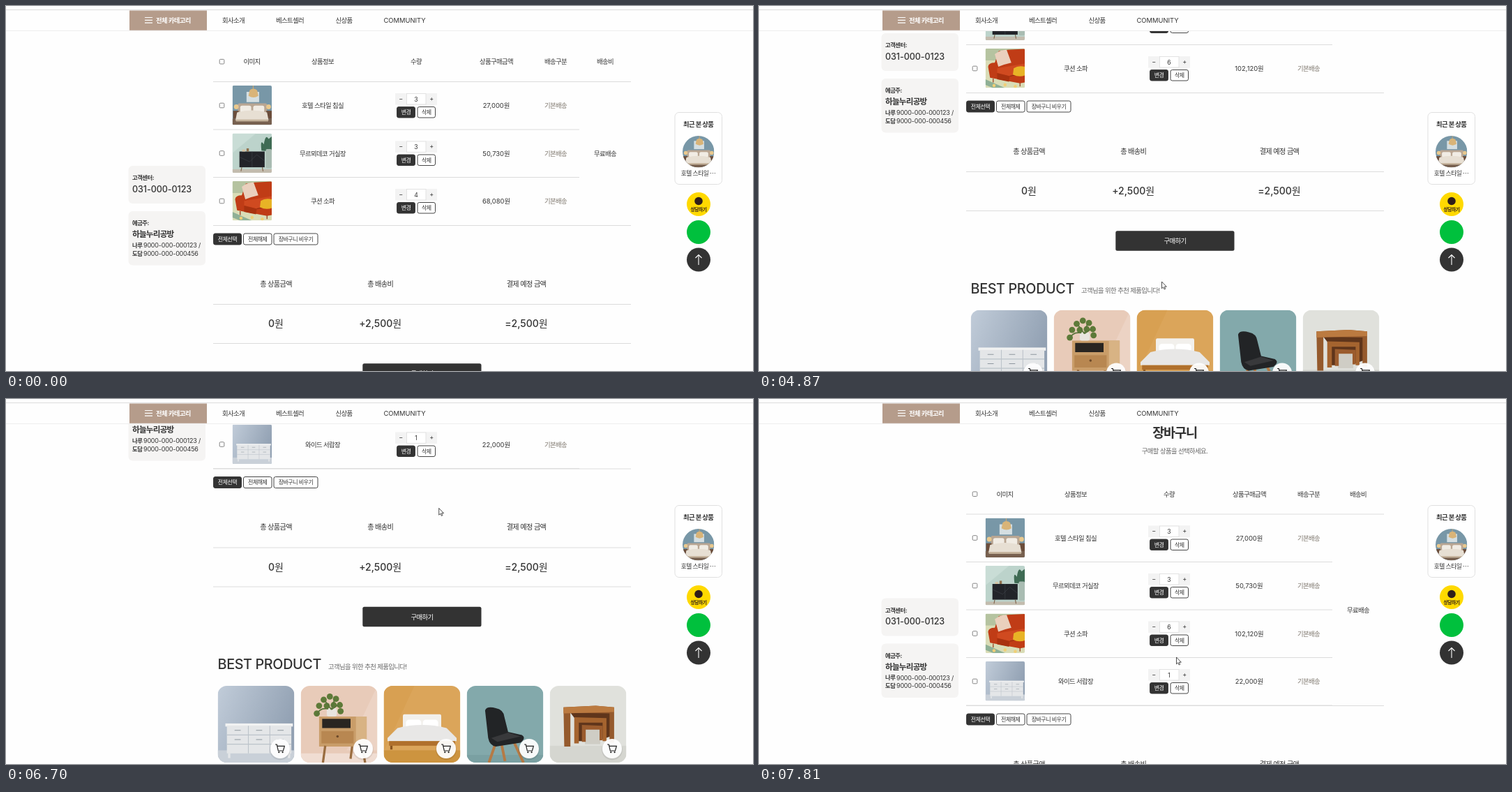
Recreate the animation shown at these times as an HTML page. Size 1071x523 px, loop 8 s.

```html
<!DOCTYPE html>
<html lang="ko">
<head>
<meta charset="utf-8">
<title>장바구니</title>
<style>
  html, body { margin: 0; width: 100%; height: 100%; overflow: hidden; background: #fefefe; }
  svg { display: block; width: 1071px; height: 523px; }
  text { font-family: Inter, "Noto Sans CJK KR", "Noto Sans CJK", sans-serif; white-space: pre; }
  .ui text { font-family: "Noto Sans", "Noto Sans CJK KR", "Noto Sans CJK", sans-serif; }
</style>
</head>
<body>
<svg id="stage" viewBox="0 0 1071 523"></svg>
<script>
const LOOP = 8000, ROW = 68.5, TABLE_TOP = 108.5, TABLE_END = TABLE_TOP + 3 * ROW;
const DARK = '#333', BROWN = '#b59c8b';

// y is the vertical centre of the text
function text(str, x, y, { size = 9.4, anchor = 'middle', weight = 400, fill = DARK, ls, extra = '' } = {}) {
  const spacing = ls ?? (/[\dA-Z]/.test(str) ? 0 : -0.065 * size);
  return `<text x="${x}" y="${y + 0.37 * size}" font-size="${size}" text-anchor="${anchor}" font-weight="${weight}" fill="${fill}" letter-spacing="${spacing}" ${extra}>${str}</text>`;
}
const left = (str, x, y, opts) => text(str, x, y, { anchor: 'start', ...opts });
const rect = (x, y, w, h, fill, r = 0, extra = '') =>
  `<rect x="${x}" y="${y}" width="${w}" height="${h}" rx="${r}" fill="${fill}" ${extra}/>`;
const circle = (x, y, r, fill, extra = '') => `<circle cx="${x}" cy="${y}" r="${r}" fill="${fill}" ${extra}/>`;
const path = (d, fill, extra = '') => `<path d="${d}" fill="${fill}" ${extra}/>`;
const stroke = (d, color, width = 1) => path(d, 'none', `stroke="${color}" stroke-width="${width}"`);
const rule = (y, x2 = 896, x1 = 297) => stroke(`M${x1} ${y}H${x2}`, '#dcdcdc');
const group = (id, body, extra = '') => `<g id="${id}" ${extra}>${body}</g>`;
const photo = (name, x, y, size, extra = '') => `<use href="#${name}" x="${x}" y="${y}" width="${size}" height="${size}" ${extra}/>`;
const checkbox = y => rect(306.2, y - 3.3, 6.6, 6.6, '#fff', 1.2, 'stroke="#767676" stroke-width=".9"');

function button(label, x, y, w, h, dark, size = 8, id = '') {
  return rect(x + .5, y + .5, w - 1, h - 1, dark ? DARK : '#fff', 2.5, `stroke="${DARK}" stroke-width=".9" ${id && `id="${id}"`}`)
    + text(label, x + w / 2, y + h / 2, { size, fill: dark ? '#fff' : DARK, weight: dark ? 500 : 400 });
}

const photos = {
  bedroom: rect(0, 0, 100, 100, '#7897a7') + rect(0, 84, 100, 16, '#77604f') + rect(36, 16, 32, 26, '#d5dfe2')
    + stroke('M53 0V10', '#c9a873', 2) + path('M44 12Q53 4 63 12L66 26Q54 34 41 26Z', '#d9b478')
    + rect(14, 45, 74, 32, '#b9a693', 4) + circle(10, 54, 6, '#e9c88d') + circle(92, 54, 6, '#e9c88d')
    + rect(2, 64, 14, 20, '#6b4d3b') + rect(86, 64, 14, 20, '#6b4d3b')
    + rect(20, 51, 28, 18, '#f1ece4', 5) + rect(53, 51, 28, 18, '#f1ece4', 5)
    + path('M12 68Q50 58 88 68L92 88H8Z', '#e7dfd3') + rect(9, 86, 82, 5, '#c4b29b'),
  lounge: rect(0, 0, 100, 100, '#bcd3cb') + path('M0 0H60L0 50Z', '#c9ddd6') + rect(0, 91, 100, 9, '#c3bcae')
    + path('M74 44Q70 12 80 28Q84 0 92 14L100 8V46Z', '#3f6b54') + rect(85, 40, 15, 48, '#a9bcb2', 3)
    + rect(18, 46, 64, 40, '#222429') + stroke('M50 46V86M18 60L44 72L62 54L82 70', '#4b4e55', .8)
    + stroke('M24 86L22 96M76 86L78 96', '#7d6249', 2) + rect(36, 38, 6, 8, '#91724f') + rect(25, 41, 8, 5, '#d6c3a3'),
  sofa: rect(0, 0, 100, 100, '#d9dcb6') + path('M0 0H100V30H0Z', '#b5c3a0') + path('M0 78L50 100H20L0 92Z', '#8fb096')
    + path('M7 46Q8 36 24 36L34 6L58 3L100 1V86L88 88L12 74Z', '#c03c16') + path('M30 50L100 38V62L62 70L30 62Z', '#d04a20')
    + path('M30 62L62 70L60 84L30 78Z', '#a8320f') + stroke('M62 70L100 62M20 76V86M88 87V96', '#8f2a0d', 2)
    + path('M24 14Q40 2 54 3L66 36Q48 40 33 46Z', '#ead0bd') + path('M72 50Q84 42 100 46V68Q86 74 70 66Z', '#e8b326')
    + circle(22, 94, 4, '#f0cf76') + circle(50, 92, 4, '#f0cf76') + circle(76, 96, 4, '#f0cf76'),
  dresser: rect(0, 0, 100, 100, 'url(#wall)') + rect(0, 84, 100, 16, '#c9d0d8') + rect(10, 49, 88, 4, '#f1f2f2')
    + rect(12, 52, 84, 36, '#e4e6e8') + stroke('M12 64H96M12 76H96M40 52V88M68 52V88', '#bcc3ca', 1)
    + stroke('M22 58H30M50 58H58M78 58H86M22 70H30M50 70H58M78 70H86', '#8e979f', 1) + stroke('M15 88V94M93 88V94', '#e4e6e8', 3),
  nightstand: rect(0, 0, 100, 100, '#e8cbb9') + path('M100 0V84H60Z', '#ecd3c4') + rect(0, 88, 100, 12, '#f0ddd2')
    + path('M24 40H86V77L80 79H24Z', '#c99d69') + path('M72 40H86V77L80 79H72Z', '#d8b384') + rect(28, 43, 37, 12, '#292521') + rect(27, 59, 42, 16, '#b88751')
    + circle(48, 66, 1.6, '#6e4a2a') + stroke('M32 78L29 100M80 78L84 100M67 79L65 95', '#9a6d40', 3) + rect(34, 29, 13, 11, '#e9e5df', 3)
    + [[30, 18], [38, 14], [46, 17], [51, 25], [43, 25], [34, 26], [24, 26], [21, 36], [52, 33]].map(([x, y]) => circle(x, y, 4, '#5d7a38')).join('')
    + stroke('M40 31L32 20M40 31L44 18M40 31L50 24M36 30Q24 28 21 38', '#58733a', 1.5),
  bed: rect(0, 0, 100, 100, '#dba55a') + path('M0 0H40L0 86Z', '#d8a052') + rect(0, 84, 100, 16, '#cd943f')
    + rect(25, 37, 50, 22, '#f2f0ec', 2) + rect(29, 44, 20, 11, '#fff', 4) + rect(51, 44, 20, 11, '#fff', 4)
    + path('M18 55Q50 47 82 55L95 68V72H5V68Z', '#e8e7e6') + rect(7, 72, 86, 6, '#b0702c') + stroke('M10 78V83M90 78V83', '#8b551f', 3),
  chair: rect(0, 0, 100, 100, '#83a9ab') + rect(0, 90, 100, 10, '#7aa0a2')
    + stroke('M38 74L29 100M62 74L74 100M45 74L50 98', '#b57a45', 3.5)
    + path('M24 32Q26 26 38 29Q48 31 49 40L54 60L72 64Q78 68 70 74L38 79Q30 78 28 68Z', '#222426') + path('M32 68L54 61L70 66L40 73Z', '#38393b'),
  tables: rect(0, 0, 100, 100, '#e0e1dc') + rect(0, 78, 100, 22, '#d5d6d0')
    + path('M27 35H79V66L62 72H34V44Z', '#5f351b') + rect(46, 56, 20, 20, '#cfcdc5')
    + path('M18 28L60 26L84 28V74H78V36L27 35V79H19Z', '#955a2d') + path('M18 28L60 26L84 28V34L18 36Z', '#bb7a40')
    + path('M32 41L74 42V72H69V48H38V75H32Z', '#a5642f') + path('M42 51L69 52V71H65V57H47V73H42Z', '#9b5c2e'),
};

function itemRow({ name, art, qty, price }, i) {
  const y = TABLE_TOP + i * ROW;
  return group('row' + i, checkbox(y + 34) + photo(art, 324.5, y + 5.5, 56.5, 'clip-path="inset(0 round 2px)"')
    + text(name, 454, y + 34.3, { weight: 500 })
    + rect(558, y + 16.5, 60, 16.5, '#f3f3f3') + rect(602, y + 16.5, 16, 16.5, '#f3f3f3', 0, `id="plus${i}"`)
    + rect(574.5, y + 17, 27.5, 15.5, '#fff', 0, 'stroke="#ddd" stroke-width=".8"')
    + text('−', 566, y + 23.8, { size: 9 }) + text('+', 610, y + 23.8, { size: 9 })
    + text(qty, 588, y + 25, { size: 8.6, extra: `id="qty${i}"` })
    + button('변경', 560, y + 35.5, 27, 16.5, true, 8, 'apply' + i) + button('삭제', 589.5, y + 35.5, 26.5, 16.5, false)
    + text(price, 703, y + 34.3, { extra: `id="price${i}"` }) + text('기본배송', 788, y + 34.3, { fill: '#7d766c' })
    + (i === 2 ? group('divider', rule(y + ROW, 822)) : rule(y + ROW, 822)));
}

const items = [
  { name: '호텔 스타일 침실', art: 'bedroom', qty: 3, price: '27,000원' },
  { name: '무르뫼데코 거실장', art: 'lounge', qty: 3, price: '50,730원' },
  { name: '쿠션 소파', art: 'sofa', qty: 4, price: '68,080원' },
  { name: '와이드 서랍장', art: 'dresser', qty: 1, price: '22,000원' },
];

const tableHead = [['이미지', 352.5], ['상품정보', 454], ['수량', 588], ['상품구매금액', 703], ['배송구분', 788], ['배송비', 859]];
const table = text('장바구니', 596, -8, { size: 18.6, weight: 700 }) + text('구매할 상품을 선택하세요.', 596, 18, { fill: '#666' })
  + checkbox(79.7) + tableHead.map(([label, x]) => text(label, x, 80)).join('') + rule(TABLE_TOP)
  + items.map(itemRow).join('') + text('무료배송', 859, 0, { weight: 500, extra: 'id="delivery"' });

const sidebar = rect(175.5, 229, 110.5, 54, '#f5f4f3', 6) + rect(175.5, 294, 110.5, 77.5, '#f5f4f3', 6)
  + left('고객센터:', 181, 246, { size: 8.4, weight: 700 }) + left('031-000-0123', 181, 262, { size: 12.6, weight: 500, ls: -.1 })
  + left('예금주:', 181, 311, { size: 8.4, weight: 700 }) + left('하늘누리공방', 181, 327, { size: 11.6, weight: 600 })
  + [['나루', '9000-000-000123 /', 342.7], ['도담', '9000-000-000456', 354.5]].map(([bank, account, y]) =>
    left(bank, 181, y, { size: 8.4, weight: 700 }) + left(account, 197, y, { size: 9, ls: -.2 })).join('');

const CARD_Y = 625.5, cardX = i => 303.5 + 119 * i;
function card(art, i) {
  const x = cardX(i) + 89.5, y = CARD_Y + 90;
  return `<g clip-path="url(#cardClip${i})">` + photo(art, cardX(i), CARD_Y, 110) + (i ? '' : hoverInfo)
    + circle(x, y + 1.5, 15, '#000', 'opacity=".08"') + circle(x, y, 14, '#fff', 'opacity=".94"')
    + group('cart' + i, stroke('M-7-6H-4.7L-2.7 3H4.5L6.3-3.7H-4', '#222', 1.2)
    + circle(-1.7, 5.2, 1.1, '#222') + circle(3.6, 5.2, 1.1, '#222'), `transform="translate(${x} ${y})"`) + '</g>';
}
const tag = (label, x, fill) => rect(x, 710.5, 18, 12, fill) + text(label, x + 9, 716.5, { size: 7.4, fill: '#fff' });
const hoverInfo = group('hover', rect(303.5, CARD_Y, 110, 110, '#fff', 0, 'opacity=".76"')
  + left('와이드 서랍장', 312, 644, { size: 8.6, weight: 700 })
  + left('관리가 손쉬운 와이드 서랍장', 312, 667.5, { size: 8.6, fill: '#666' })
  + left('25,000원', 312, 692, { size: 7.4, fill: '#777', extra: 'text-decoration="line-through"' })
  + left('22,000원', 345, 691.5, { size: 8.4, weight: 600 }) + left('12%', 384, 691.5, { size: 8.6, weight: 600, fill: '#f0392b' })
  + tag('인기', 312, BROWN) + tag('신규', 332.5, '#666'));

const cards = ['dresser', 'nightstand', 'bed', 'chair', 'tables'];
const links = [['회사소개', 171], ['이용약관', 216], ['개인정보처리방침', 261], ['이용안내', 333.5]];
const totals = [['총 상품금액', '0원', 387], ['총 배송비', '+2,500원', 536.7], ['결제 예정 금액', '=2,500원', 746]];
const lower = rule(TABLE_END + .5) + button('전체선택', 297, 325.5, 41, 17, true) + button('전체해제', 340, 325.5, 41.5, 17, false)
  + button('장바구니 비우기', 383.5, 325.5, 64, 17, false)
  + totals.map(([label, sum, x]) => text(label, x, 398, { size: 10.2 }) + text(sum, x, 455.3, { size: 14, weight: 500 })).join('')
  + rule(427.5) + rule(483.5) + rect(511.3, 512.2, 170.2, 28.5, DARK, 2.5) + text('구매하기', 596.5, 526.8, { fill: '#fff', weight: 500 })
  + left('BEST PRODUCT', 303.5, 594.2, { size: 19.8, weight: 500, ls: -.35 })
  + left('고객님을 위한 추천 제품입니다!', 462, 597.7, { fill: '#666' })
  + cards.map(card).join('')
  + Array.from({ length: 12 }, (_, i) => circle(503.5 + 17 * i, 744, i === 4 ? 1.8 : 1.5, i === 4 ? '#222' : '#aaa')).join('')
  + rect(0, 764, 1071, 400, '#f5f5f3') + links.map(([label, x]) => left(label, x, 797, { size: 8.3, weight: 700 })).join('');

const nav = [['회사소개', 310], ['베스트셀러', 387], ['신상품', 472.5], ['COMMUNITY', 541.5]];
const header = rect(0, 0, 1071, 35.5, '#fefefe') + rule(5.5, 1071, 0) + stroke('M0 35.5H1071', '#eee')
  + rect(177, 6.5, 111, 28.3, BROWN) + stroke('M199 16.5H210M199 20.3H210M199 24.1H210', '#fff', 1.2)
  + left('전체 카테고리', 215, 20.7, { weight: 700, fill: '#fff' })
  + nav.map(([label, x]) => left(label, x, 20.7)).join('');

const floating = rect(959, 152.5, 67.5, 103, '#fff', 6, 'stroke="#ddd" stroke-width=".9"')
  + text('최근 본 상품', 992.7, 170, { weight: 700 })
  + `<g clip-path="url(#recent)">${photo('bedroom', 970, 186, 45.5)}</g>`
  + text('호텔 스타일 ⋯', 992.5, 239.7, { size: 8.8 })
  + circle(993, 284, 17, '#ffd900') + circle(993, 279.5, 5.8, '#2f1e1a') + text('상담하기', 993, 291.5, { size: 6.8, weight: 700, fill: '#2f1e1a' })
  + circle(993, 324, 17, '#00c03d') + circle(993, 363.5, 17, DARK) + stroke('M993 371V356.5M988.5 361L993 356.5L997.5 361', '#fff', 1.1);

const dialog = rect(410.5, -20, 255, 86.5, '#fff', 7, 'stroke="#ccc" stroke-width=".8" filter="url(#shadow)"')
  + left('curmemn-shop-around.netlify.app 내용:', 422.5, 1.6, { size: 8.7, fill: '#222', ls: 0 })
  + left('', 422.5, 18, { size: 8.1, fill: '#222', ls: 0, extra: 'id="message"' })
  + rect(615.5, 31.5, 40, 24.5, '#fff', 12, 'stroke="#0b57d0" stroke-width="1.3"') + rect(617.5, 33.5, 36, 20.5, '#0b57d0', 10.2)
  + text('확인', 635.5, 43.6, { size: 7.9, fill: '#fff', ls: 0 });

const status = rect(-4, 514, 166, 14, '#e3e4e6', 2, 'stroke="#cfcfcf" stroke-width=".7"')
  + left('https://curmemn-shop-around.netlify.app/product/5', -4, 519.8, { size: 6.6, fill: '#555', ls: 0 });

const pointer = group('arrow', path('M0 0V9.8L2.2 7.8L3.7 11L5.2 10.3L3.8 7.2H6.8Z', '#fff', 'stroke="#222" stroke-width=".8"'))
  + group('hand', path('M-1.1 1.2Q-1.1-.2 0-.2T1.1 1.2V5.4L5.4 6.3Q6.6 6.6 6.4 8L5.6 11.5V14H-1.2V12L-4 8.2Q-4.2 6.8-2.7 7.2L-1.1 8.6Z', '#fff', 'stroke="#222" stroke-width=".9"'));

const defs = `<defs>
  <linearGradient id="wall" x2="1" y2=".4"><stop stop-color="#c1ccd9"/><stop offset="1" stop-color="#92a1b3"/></linearGradient>
  <filter id="shadow"><feDropShadow dx="0" dy="1" stdDeviation="1.5" flood-opacity=".3"/></filter>
  <clipPath id="recent">${circle(992.7, 208.7, 22.7, '#000')}</clipPath>
  ${cards.map((_, i) => `<clipPath id="cardClip${i}">${rect(cardX(i), CARD_Y, 110, 110, '#000', 13)}</clipPath>`).join('')}
  ${Object.entries(photos).map(([name, art]) => `<symbol id="${name}" viewBox="0 0 100 100">${art}</symbol>`).join('')}
</defs>`;

document.getElementById('stage').innerHTML = defs + group('page', sidebar + table + group('lower', lower)) + header + floating
  + group('status', status, 'class="ui"') + group('dialog', dialog, 'class="ui"') + group('cursor', pointer);

const el = id => document.getElementById(id);
const show = (id, on) => el(id).setAttribute('display', on ? 'inline' : 'none');
const move = (id, x, y) => el(id).setAttribute('transform', `translate(${x} ${y})`);
const during = (t, a, b) => t >= a && t < b;

// time, x, y, pointing hand
const cursorKeys = [
  [460, 1013, 381], [600, 850, 180], [740, 640, 66], [1000, 444, 162], [1260, 444, 162], [1600, 632, 215],
  [2010, 607, 272, 1], [2140, 609.5, 270.5, 1], [2880, 609.5, 270.5, 1], [3150, 575, 291, 1], [3540, 575, 291], [3710, 575, 291],
  [4030, 622.5, 56], [4170, 634, 46], [4310, 634, 46], [4520, 600, 314], [4590, 600, 314], [4870, 577.5, 395],
  [5340, 577.5, 395], [5600, 411, 428, 1], [5700, 393, 432, 1], [5880, 393, 432, 1], [6060, 504.5, 199, 1], [6270, 635, 45],
  [6410, 635, 45], [6900, 610, 240], [7040, 608, 229], [7740, 602, 339], [7810, 598.5, 370],
];
const scrollKeys = [[4520, 0], [4590, 20], [4870, 190], [4940, 283], [6900, 283], [6970, 240], [7040, 197], [7390, 40], [7740, -56.5]];

function sample(keys, t) {
  const next = keys.findIndex(key => key[0] > t);
  if (next < 0) return keys[keys.length - 1].slice(1);
  if (next === 0) return keys[0].slice(1);
  const a = keys[next - 1], b = keys[next], k = (t - a[0]) / (b[0] - a[0]);
  return [...[1, 2].map(i => a[i] + (b[i] - a[i]) * k), a[3]];
}

function render(t) {
  const tick = Math.floor((t - 40) / 70) * 70 + 40;
  const [x, y, hand] = sample(cursorKeys, tick);
  const [scroll] = sample(scrollKeys, tick);
  const added = t >= 6340;
  const qty = t < 2410 ? 4 : t < 2620 ? 5 : 6;

  move('page', 0, -scroll);
  move('lower', 0, added ? ROW : 0);
  show('row3', added);
  show('divider', added);
  el('delivery').setAttribute('y', TABLE_TOP + ROW * (added ? 2 : 1.5) + 3.5);
  el('qty2').textContent = qty;
  el('price2').textContent = (qty * 17020).toLocaleString('en-US') + '원';
  el('plus2').setAttribute('fill', during(t, 1940, 3000) ? '#dcdcdc' : '#f3f3f3');
  el('apply2').setAttribute('fill', during(t, 3090, 4340) ? '#000' : DARK);

  const changed = during(t, 3540, 4310), hovered = during(t, 5600, 6340);
  show('dialog', changed || during(t, 5880, 6340));
  move('dialog', 0, changed ? 1.2 : 0);
  el('message').textContent = changed ? '쿠션 소파의 수량이 6개로 변경되었습니다.' : '장바구니에 추가되었습니다.';
  show('hover', hovered);
  show('status', hovered);
  el('cart0').setAttribute('opacity', hovered ? .55 : 1);

  show('cursor', t >= 460);
  move('cursor', x, y);
  show('hand', hand);
  show('arrow', !hand);
}

const start = performance.now();
function frame() {
  render((performance.now() - start) % LOOP);
  requestAnimationFrame(frame);
}
frame();
</script>
</body>
</html>
```
